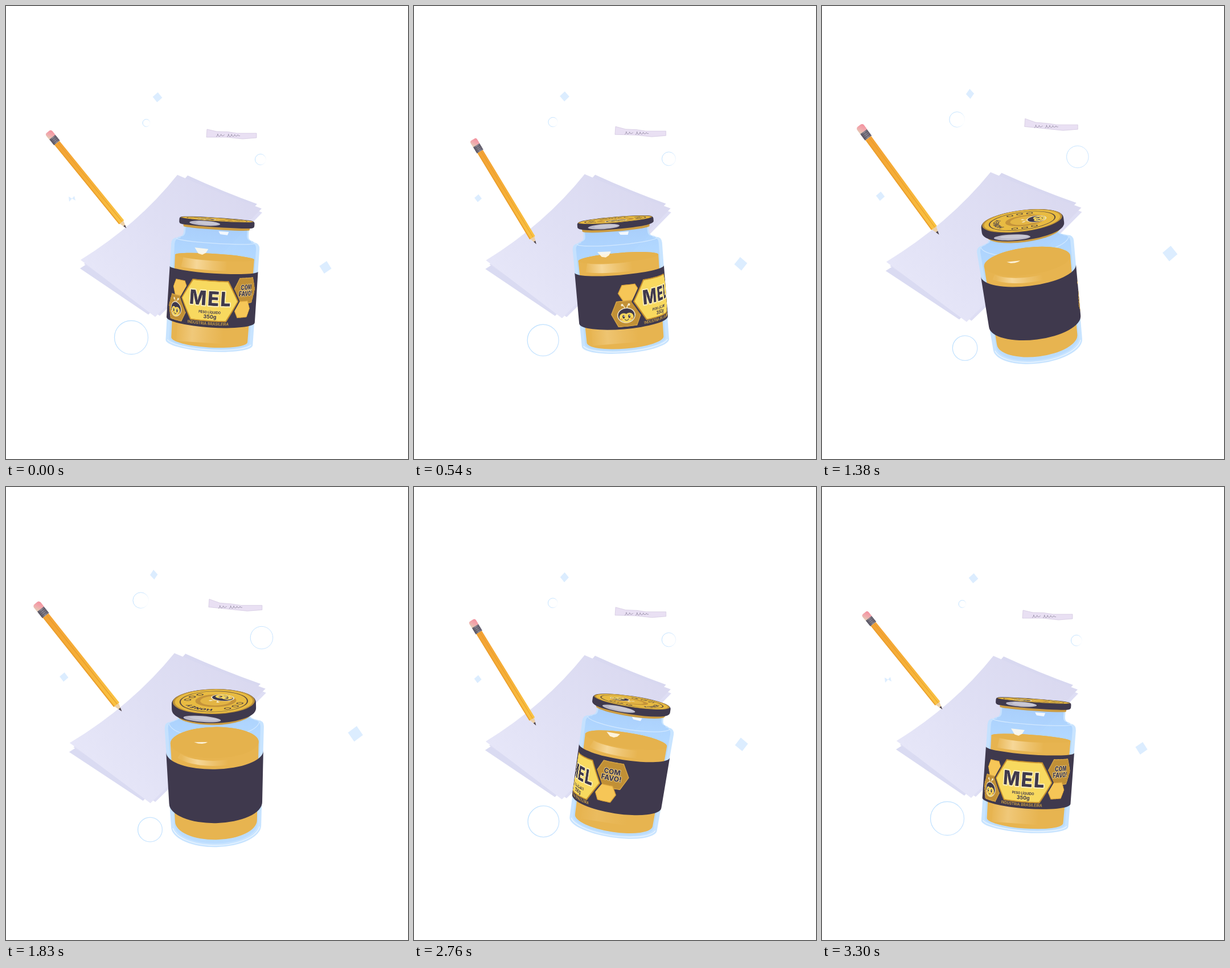
Recreate the animation shown at these times as an HTML page with a canvas. Size 706x794 px, loop 3330 ms.

```html
<!DOCTYPE html>
<html lang="pt">
<head>
<meta charset="utf-8">
<title>Mel</title>
<style>
  html, body { margin: 0; width: 706px; height: 794px; overflow: hidden; background: #fff; }
  canvas { display: block; }
</style>
</head>
<body>
<canvas id="stage" width="706" height="794"></canvas>
<script>
const LOOP = 3330, STEP = 30, DEG = Math.PI / 180, PI = Math.PI;
const DARK = '#3f394d', GOLD = '#e7b450', TAN = '#c4933a', YELLOW = '#f8d95f';
const ctx = document.getElementById('stage').getContext('2d');

function poly(g, pts, fill) {
  g.beginPath();
  for (let i = 0; i < pts.length; i += 2) g.lineTo(pts[i], pts[i + 1]);
  g.closePath();
  g.fillStyle = fill;
  g.fill();
}

function oval(g, x, y, rx, ry, fill, turn = 0) {
  g.beginPath();
  g.ellipse(x, y, rx, ry, turn, 0, 2 * PI);
  g.fillStyle = fill;
  g.fill();
}

function hex(g, x, y, w, h, fill) {
  const k = w * .6;
  poly(g, [x - w, y, x - k, y - h, x + k, y - h, x + w, y, x + k, y + h, x - k, y + h], fill);
}

function text(g, str, x, y, size, fill, weight = 800, outline = 0, outlineColor = '#fdf0b8') {
  g.font = `${weight} ${size}px Inter, sans-serif`;
  g.textAlign = 'center';
  g.textBaseline = 'middle';
  g.lineJoin = 'round';
  if (outline) {
    g.strokeStyle = outlineColor;
    g.lineWidth = outline;
    g.strokeText(str, x, y);
  }
  g.fillStyle = fill;
  g.fillText(str, x, y);
}

function gradient(x0, y0, x1, y1, ...colors) {
  const g = ctx.createLinearGradient(x0, y0, x1, y1);
  colors.forEach((color, i) => g.addColorStop(i / (colors.length - 1), color));
  return g;
}

function makeLayer(w, h, scale) {
  const layer = document.createElement('canvas');
  layer.width = w * scale;
  layer.height = h * scale;
  layer.getContext('2d').scale(scale, scale);
  return layer;
}

function bee(g, x, y) {
  g.strokeStyle = '#f6edd0';
  g.lineWidth = 1.4;
  for (const side of [-1, 1]) {
    g.beginPath();
    g.moveTo(x + side * 2, y - 10);
    g.quadraticCurveTo(x + side * 2, y - 17, x + side * 6, y - 18);
    g.stroke();
    oval(g, x + side * 6, y - 18, 2, 2, '#f6edd0');
  }
  oval(g, x, y, 16, 13, '#f6edd0');
  oval(g, x, y, 14.5, 11.7, DARK);
  oval(g, x - 5, y + 3, 7.5, 7, YELLOW);
  oval(g, x + 5, y + 3, 7.5, 7, YELLOW);
  oval(g, x, y + 6, 9, 6, YELLOW);
  for (const side of [-1, 1]) {
    oval(g, x + side * 5, y + 2, 2, 3, DARK);
    oval(g, x + side * 5 + .6, y + 1, .8, 1, '#fff');
    oval(g, x + side * 9, y + 6, 2, 1.4, '#e8a044');
  }
  g.strokeStyle = DARK;
  g.lineWidth = 1;
  g.beginPath();
  g.arc(x, y + 5, 3.5, .3, PI - .3);
  g.stroke();
}

// Label artwork, unrolled: 1.361 units per degree, 92 units high
const UNIT = 1.361, LABEL_W = 240, LABEL_H = 92, RES = 2;
const label = makeLayer(LABEL_W, LABEL_H, RES);
(function paintLabel(g) {
  g.translate(LABEL_W / 2, 0);
  const tile = (x, y, w, h, rim, fill) => {
    hex(g, x, y, w, h, rim);
    hex(g, x, y, w - 1.5, h - 1.3, fill);
  };
  tile(-61, 31, 20, 14, '#dda53c', '#f6c657');
  tile(-68, 66, 28, 22, '#dba847', '#c19036');
  bee(g, -69, 69);
  tile(73, 29, 30.5, 22.5, '#dba847', '#c19036');
  tile(66, 61, 20, 14.5, '#dda53c', '#f6c657');
  hex(g, 0, 47, 58, 37, DARK);
  hex(g, 0, 47, 55, 35, '#c8932f');
  hex(g, 0, 47, 52.5, 33, YELLOW);
  g.letterSpacing = '2px';
  text(g, 'MEL', 2, 45, 34, DARK, 800, 4);
  g.letterSpacing = '0px';
  text(g, 'PESO LÍQUIDO', 2, 67, 5.6, DARK, 700);
  text(g, '350g', 3, 74.5, 9, DARK, 700);
  text(g, 'INDÚSTRIA BRASILEIRA', 0, 86, 6.6, '#d3a544', 600);
  text(g, 'COM', 73, 24, 12, DARK, 800, 1.8, '#ecd08b');
  text(g, 'FAVO!', 73, 35, 12, DARK, 800, 1.8, '#ecd08b');
})(label.getContext('2d'));

// The label bent around the jar, before the jar is tilted
const WRAP_W = 180, WRAP_H = 190, WRAP_Y = -60;
const wrap = makeLayer(WRAP_W, WRAP_H, RES), wrapCtx = wrap.getContext('2d');
wrapCtx.translate(WRAP_W / 2, -WRAP_Y);

function wrapLabel(spin, r, topAt, bottomAt) {
  wrapCtx.clearRect(-WRAP_W / 2, WRAP_Y, WRAP_W, WRAP_H);
  const angleAt = x => Math.asin(Math.max(-1, Math.min(1, x / r)));
  const width = 1 / RES;
  for (let x = -Math.floor(r); x < r; x += width) {
    const a = angleAt(x), b = angleAt(x + width), cos = Math.cos((a + b) / 2);
    const deg = ((a / DEG - spin + 180) % 360 + 360) % 360 - 180;
    const u = LABEL_W / 2 + deg * UNIT, w = Math.max(.2, (b - a) / DEG * UNIT);
    if (u < 0 || u + w > LABEL_W) continue;
    const top = topAt(cos);
    wrapCtx.drawImage(label, u * RES, 0, w * RES, LABEL_H * RES, x, top, width, bottomAt(cos) - top);
  }
}

function paintLid(g) {
  oval(g, 0, 0, 100, 100, '#bb9039');
  oval(g, 0, 0, 95, 95, '#e8bb42');
  g.strokeStyle = '#5b4a3f';
  g.lineWidth = 3;
  g.beginPath();
  g.arc(0, 0, 82, 0, 2 * PI);
  g.stroke();
  oval(g, 0, 8, 50, 50, TAN);
  oval(g, 0, 8, 38, 38, '#e3b544');
  for (let i = 0; i < 5; i++) {
    g.save();
    g.rotate((i - 2) * 14 * DEG);
    text(g, 'HONEY'[i], 0, -64, 20, DARK);
    g.restore();
  }
  for (const a of [-112, -90, -68, 68, 90, 112]) {
    const x = 66 * Math.sin(a * DEG), y = -66 * Math.cos(a * DEG);
    hex(g, x, y, 9, 8, '#5b4a3f');
    hex(g, x, y, 6, 5, '#e8bb42');
  }
  g.save();
  g.translate(0, 36);
  g.scale(1.9, 1.9);
  bee(g, 0, 0);
  g.restore();
}

function diamond(x, y, w, h, turn = 0) {
  ctx.save();
  ctx.translate(x, y);
  ctx.rotate(turn);
  poly(ctx, [-w, 0, 0, -h, w, 0, 0, h], '#dcedff');
  ctx.restore();
}

function ring(x, y, r, fade, width) {
  ctx.strokeStyle = gradient(x - r, y - r * .3, x + r, y + r * .3, '#bfe1ff', '#cae6ff', `rgba(185,220,255,${fade})`);
  ctx.lineWidth = width;
  ctx.beginPath();
  ctx.arc(x, y, r, 0, 2 * PI);
  ctx.stroke();
}

function drawShapes(a, m) {
  diamond(266 - 6.5 * m, 160 - 6.5 * m, 7.6 + .9 * Math.cos(a - .5), 8.7, .08 * Math.cos(a));
  diamond(561 + 54 * m, 458 - 26 * m, 10.8 + 2.6 * m, 11.3 + 2.6 * m, .2 * Math.cos(2 * a));
  const x = 116 - 14.5 * m, y = 338 - 5 * m, s = 6 + 1.8 * m;
  const twisted = Math.abs(Math.sin(2 * a)) < .2 && Math.cos(a) > -.5 && Math.sin(a) > -.5;
  if (twisted) poly(ctx, [x - s, y - 4, x + s, y + 3, x + 4, y - 5, x - 5, y + 5], '#dcedff');
  else diamond(x, y, s, s + .5, .1);
  ring(220 + 26 * m + 8 * m * m, 581 + 20 * m, 29.5 - 8.3 * m, .75, 1.3);
  ring(246.5 - 10 * m, 205 - 6.5 * m, 6.5 + 7.5 * m, 0, 1);
  ring(447 + 2 * m, 269 - 5 * m, 9.5 + 10.5 * m, m * .8, 1);
}

function drawSheets(m) {
  const sheet = (top, right, bottom, left, fill) => {
    ctx.beginPath();
    ctx.moveTo(...top);
    ctx.quadraticCurveTo((top[0] + right[0]) / 2, (top[1] + right[1]) / 2 + 3, ...right);
    ctx.quadraticCurveTo((right[0] + bottom[0]) / 2 + 6, (right[1] + bottom[1]) / 2 - 4, ...bottom);
    ctx.lineTo(...left);
    ctx.quadraticCurveTo((top[0] + left[0]) / 2 + 16, (top[1] + left[1]) / 2 + 12, ...top);
    ctx.fillStyle = fill;
    ctx.fill();
  };
  ctx.save();
  ctx.translate(366, 382);
  ctx.scale(1 + .083 * m, 1 + .058 * m);
  ctx.translate(-366, -382);
  sheet([319, 297], [441, 347], [250, 541], [130, 460], gradient(380, 300, 170, 500, '#d8d8f0', '#dadbf2'));
  sheet([309, 300], [450, 362], [270, 543], [137, 452], '#dedef4');
  sheet([301, 296], [449, 355], [262, 545], [131, 445], gradient(390, 310, 180, 500, '#dad9f0', '#dfdff4', '#e6e6f8'));
  ctx.restore();
}

function drawStrip(m) {
  const x = 353 + 4 * m, y = 216 - 20 * m, w = 87 + 6 * m, d = 4 * m;
  ctx.lineWidth = .7;
  ctx.strokeStyle = '#d0c5de';
  poly(ctx, [x, y, x + w * .2, y + 4 + d * .7, x + w * .42, y + 4.5 + d, x + w * .6, y + 7 + d, x + w, y + 7 + d,
    x + w, y + 15 + d, x + w * .72, y + 17 + d, x + w * .4, y + 14 + d, x - 1, y + 14], '#e9e0f3');
  ctx.stroke();
  ctx.strokeStyle = '#827a92';
  const word = (from, length, loops) => {
    ctx.beginPath();
    for (let u = 0; u <= 1; u += .025) {
      const swing = u * loops * 2 * PI;
      ctx.lineTo(x + from + u * length + Math.sin(swing), y + 10 + d * .8 + from * .02 + Math.cos(swing) * (2.6 - 1.8 * u));
    }
    ctx.stroke();
  };
  word(16, 15, 2.6);
  word(35, 23, 4.2);
}

function drawPencil(a) {
  const wave = (mid, one, two, four) =>
    mid + one * Math.cos(a) + two * Math.cos(2 * a) - four * Math.sin(4 * a);
  const x = wave(86, 12, -23, 2.2), y = wave(224.8, 9.5, -12.2, .6);
  const dx = wave(210.4, 4.3, -3.6, .3) - x, dy = wave(408.3, -.5, -18.7, .7) - y;
  const size = Math.hypot(dx, dy) / 215;
  const box = (x0, x1, y0, y1, fill) => {
    ctx.fillStyle = fill;
    ctx.fillRect(x0, y0, x1 - x0, y1 - y0);
  };
  ctx.save();
  ctx.translate(x, y);
  ctx.rotate(Math.atan2(dy, dx));
  ctx.scale(size, size);
  ctx.fillStyle = gradient(0, -6, 8, 7, '#f3929f', '#f1a9ad', '#e2cdb5');
  ctx.beginPath();
  ctx.roundRect(-2, -6.8, 15, 13.6, 4);
  ctx.fill();
  box(10, 23, -6.6, 6.6, gradient(0, -6, 0, 6, '#696473', '#8b8792', '#5c5866'));
  for (const s of [13, 16, 19]) box(s, s + .8, -6.6, 6.6, '#55515f');
  poly(ctx, [200, -5, 215, 0, 200, 5], '#ecd0a6');
  poly(ctx, [209.5, -1.9, 215.5, 0, 209.5, 1.9], '#4a4350');
  box(23, 202, -5.6, 5.6, gradient(23, 0, 202, 0, '#f3a235', '#f6b038', '#f9c242'));
  box(23, 202, 3.8, 5.6, '#eb9f2e');
  box(23, 202, -1.8, -1, '#e59a2a');
  ctx.restore();
}

function drawJar(a) {
  const c = 1 - Math.cos(a - 15 * DEG);
  const spin = a / DEG - 3.5;
  const flat = y => .03 + .132 * c + .0008 * (y + 131);
  const wide = y => 77.5 + c * (3.1 - .02 * y);

  // Side of a cylinder; the upper edge follows the near or the far half of its ring
  const band = (yT, rT, yB, rB, near, fill) => {
    ctx.beginPath();
    ctx.moveTo(-rT, yT);
    ctx.lineTo(-rB, yB);
    ctx.ellipse(0, yB, rB, rB * flat(yB), 0, PI, 0, true);
    ctx.lineTo(rT, yT);
    ctx.ellipse(0, yT, rT, rT * flat(yT), 0, 0, PI, !near);
    ctx.closePath();
    ctx.fillStyle = fill;
    ctx.fill();
  };

  ctx.save();
  ctx.translate(365 - 2.8 * Math.cos(a + 15 * DEG), 505);
  ctx.rotate(-8.7 * DEG * Math.sin(a - 25 * DEG));

  // Glass
  const neck = 57 + 3 * c, yBase = 85 + 2 * c, rBase = wide(yBase) - 1;
  const glass = (inset, fill) => {
    const n = neck - inset * .5, top = wide(-86) - inset, low = rBase - inset;
    ctx.beginPath();
    ctx.moveTo(-n, -120);
    ctx.lineTo(-n, -106);
    ctx.quadraticCurveTo(-n, -98, -n - 8, -97);
    ctx.lineTo(10 - top, -95);
    ctx.quadraticCurveTo(-top, -94, -top, -84);
    ctx.lineTo(-low, yBase - inset * .6);
    ctx.ellipse(0, yBase - inset * .6, low, low * flat(yBase), 0, PI, 0, true);
    ctx.lineTo(top, -84);
    ctx.quadraticCurveTo(top, -94, top - 10, -95);
    ctx.lineTo(n + 8, -97);
    ctx.quadraticCurveTo(n, -98, n, -106);
    ctx.lineTo(n, -120);
    ctx.fillStyle = fill;
    ctx.fill();
  };
  glass(0, 'rgba(194,226,255,.9)');
  glass(6, gradient(0, -120, 0, -30, 'rgba(145,190,248,.55)', 'rgba(150,200,255,.45)', 'rgba(150,200,255,.25)'));
  ctx.strokeStyle = 'rgba(255,255,255,.7)';
  ctx.lineWidth = 1.2;
  ctx.beginPath();
  ctx.ellipse(0, yBase - 3, rBase - 2, rBase * flat(yBase), 0, .15, PI - .15);
  ctx.stroke();
  ctx.strokeStyle = 'rgba(225,241,255,.7)';
  ctx.beginPath();
  ctx.ellipse(0, -94, wide(-94) - 8, wide(-94) * flat(-94), 0, .1, PI - .1);
  ctx.stroke();

  // Honey
  const yTop = -65 + 4 * c, rTop = 69.5 + 4 * c, ry = rTop * flat(yTop);
  band(yTop, rTop, 80, 67 + 2.5 * c, false, GOLD);
  oval(ctx, 0, yTop, rTop, ry, '#e5b24d');
  const shine = gradient(-58, 0, 24, 0, 'rgba(250,224,170,.1)', 'rgba(250,224,170,.8)', 'rgba(250,224,170,.35)', 'rgba(250,224,170,0)');
  ctx.strokeStyle = shine;
  ctx.lineWidth = Math.max(9, 17 - 4.5 * c);
  ctx.beginPath();
  ctx.ellipse(0, yTop + 9, rTop * .92, ry, 0, 70 * DEG, 152 * DEG);
  ctx.stroke();
  ctx.globalAlpha = Math.max(0, .6 - c * .5);
  ctx.fillStyle = shine;
  ctx.fillRect(-58, 45, 82, 41);
  ctx.globalAlpha = 1;

  // Glints
  const gy = -74 + 8.5 * c, gh = Math.max(1.5, 6 - 2.6 * c);
  poly(ctx, [-36, gy - gh, -12, gy - gh * .8, -16, gy + gh * .4, -22, gy + gh, -29, gy + gh * .7], 'rgba(255,250,235,.9)');
  if (c < 1.3) poly(ctx, [4, -111 + 9 * c, 22, -111 + 9 * c, 20, -105 + 8 * c, 7, -106 + 8 * c], 'rgba(255,255,255,.85)');

  // Label
  const yA = -44.5 + 1.5 * c, yB = 45 + 1.7 * c, rA = wide(yA), rB = wide(yB);
  band(yA, rA, yB, rB, true, DARK);
  wrapLabel(spin, (rA + rB) / 2, cos => yA + rA * flat(yA) * cos, cos => yB + rB * flat(yB) * cos);
  ctx.save();
  ctx.clip();
  ctx.drawImage(wrap, -WRAP_W / 2, WRAP_Y, WRAP_W, WRAP_H);
  ctx.restore();

  // Lid
  const rLid = 66 + 4 * c, yLid = -131 + c, yRim = yLid + 11 + 2.8 * c, lidFlat = flat(yLid);
  band(yRim - 3, 59 + 4 * c, yRim + 4, 58 + 4 * c, false, '#cb9c43');
  band(yLid + 3, rLid - 4, yRim - 4, rLid - 4, false, DARK);
  ctx.strokeStyle = DARK;
  ctx.lineWidth = 8;
  ctx.lineJoin = 'round';
  ctx.stroke();
  ctx.save();
  ctx.translate(0, yLid);
  ctx.scale((rLid - 2) / 100, (rLid - 2) * (lidFlat + .01) / 100);
  ctx.rotate((52 - spin) * DEG);
  paintLid(ctx);
  ctx.restore();
  const yShine = (yLid + yRim) / 2 + rLid * lidFlat;
  oval(ctx, -21, yShine, 27 + 3 * c, 4.3 + .5 * c, '#b9b7c6', .05 * c);
  oval(ctx, -17, yShine - .6, 20 + 3 * c, 3, '#c9c8d4', .05 * c);
  ctx.restore();
}

function draw(t) {
  const a = 2 * PI * t / LOOP, m = (1 - Math.cos(a)) / 2;
  ctx.fillStyle = '#fff';
  ctx.fillRect(0, 0, 706, 794);
  drawShapes(a, m);
  drawSheets(m);
  drawStrip(m);
  drawPencil(a);
  drawJar(a);
}

const start = performance.now();
function tick() {
  const t = (performance.now() - start) % LOOP;
  draw(Math.floor(t / STEP) * STEP);
  requestAnimationFrame(tick);
}
tick();
</script>
</body>
</html>
```
